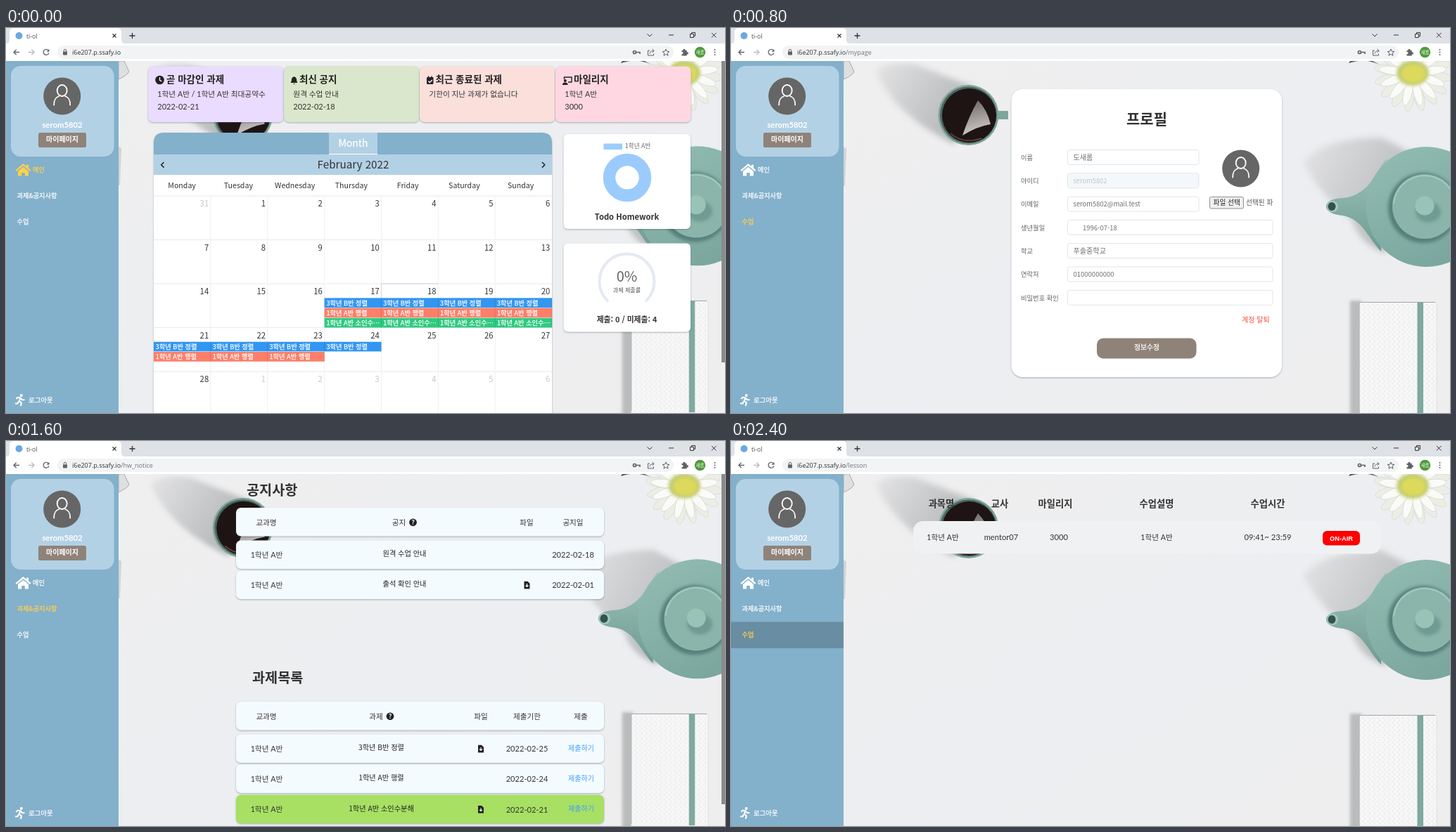
Animation of 1022 by 548 pixels, one loop 3.2 s. Source, as an HTML page:

```html
<!DOCTYPE html>
<html lang="ko">
<head>
<meta charset="utf-8">
<title>Class portal</title>
<style>
  html, body { margin: 0; width: 100%; height: 100%; overflow: hidden; background: #eee; }
  svg { display: block; width: 1022px; height: 548px; }
  text { font-family: "Noto Sans CJK KR", "Noto Sans CJK", sans-serif; white-space: pre; }
  .l { font-family: Lato, "Noto Sans CJK KR", "Noto Sans CJK", sans-serif; }
  .u { font-family: "Open Sans", "Noto Sans CJK KR", sans-serif; }
  .a { font-family: "Liberation Sans", sans-serif; }
  .m { text-anchor: middle; }
  .e { text-anchor: end; }
  .w { stroke: #fff; stroke-width: .25px; }
  .w.on { stroke: #ffd04b; }
  .b { font-weight: 700; }
  .soft { filter: blur(4px); }
  .near { filter: blur(2px); }
  .card { filter: drop-shadow(.6px 1.5px 1.2px rgba(60, 85, 95, .42)); }
  .scene { animation: show 3200ms step-end infinite; }
  @keyframes show {
    0% { visibility: visible; }
    25%, 100% { visibility: hidden; }
  }
</style>
</head>
<body>
<svg id="stage" viewBox="0 0 1022 548"></svg>
<script>
const INK = '#333', WHITE = '#fff', SIDE = '#83b0cb', PALE = '#b3d1e5', TAUPE = '#8f8379', GOLD = '#ffd04b';

const text = (x, y, s, size, fill = INK, cls = '') =>
  `<text x="${x}" y="${y}" font-size="${size}" fill="${fill}" class="${cls}">${s}</text>`;
const box = (x, y, w, h, fill, r = 0, more = '') =>
  `<rect x="${x}" y="${y}" width="${w}" height="${h}" rx="${r}" fill="${fill}" ${more}/>`;
const dot = (x, y, r, fill, more = '') => `<circle cx="${x}" cy="${y}" r="${r}" fill="${fill}" ${more}/>`;
const oval = (x, y, rx, ry, fill, more = '') =>
  `<ellipse cx="${x}" cy="${y}" rx="${rx}" ry="${ry}" fill="${fill}" ${more}/>`;
const shape = (d, fill, more = '') => `<path d="${d}" fill="${fill}" ${more}/>`;
const line = (d, stroke, w = 1, more = '') =>
  `<path d="${d}" fill="none" stroke="${stroke}" stroke-width="${w}" ${more}/>`;
const at = (x, y, s) => `<g transform="translate(${x} ${y})">${s}</g>`;
const times = (n, fn) => Array.from({ length: n }, (_, i) => fn(i)).join('');
const each = (list, fn) => list.map(fn).join('');

const fade = (id, x2, y2, from, to) =>
  `<linearGradient id="${id}" x2="${x2}" y2="${y2}"><stop stop-color="${from}"/><stop offset="1" stop-color="${to}"/></linearGradient>`;
const defs = `<defs>
  <linearGradient id="paper" x2="1" y2="1">
    <stop stop-color="#f0efef"/><stop offset=".5" stop-color="#eceef1"/><stop offset="1" stop-color="#efeeee"/>
  </linearGradient>
  ${fade('pot', .5, 1, '#93bdb3', '#7ba79e')}
  ${fade('spout', 0, 1, '#9cc3b9', '#6f9b92')}
  ${fade('gleam', .2, 1, '#6b6362', '#cbc8c7')}
  ${fade('shade', 1, .5, '#e4e4e5', '#b3b5b7')}
  <pattern id="weave" width="7" height="7" patternUnits="userSpaceOnUse">
    <path d="M1 2h3M5 4v3" stroke="#e4e6e7" stroke-width="1.2"/>
  </pattern></defs>`;

// Desk photo reduced to flat shapes
const petals = (n, len, w, fill, turn) => times(n, i =>
  oval(0, -len * .6, w, len * .42, fill, `transform="rotate(${turn + i * 360 / n})" stroke="#d3d8cc" stroke-width=".7"`));
const cup = shape('M206 62Q222 46 262 52L345 84L318 165Q234 126 206 62Z', 'url(#shade)', 'class="soft"')
  + box(374, 118, 20, 12, '#7da69b', 1)
  + dot(337.5, 124, 43, '#7fa59b') + dot(337.5, 124, 40.5, '#4d6660') + dot(338.5, 124.5, 38.5, '#1e1414')
  + shape('M351 103Q364 116 369 137Q350 140 329 153Q338 126 351 103Z', 'url(#gleam)')
  + line('M312 150Q330 166 356 157', '#6b4a38', 1.6);
const flower = shape('M878 50Q900 42 922 52L912 47H880Z', '#4c5a43')
  + at(969, 64, petals(16, 54, 7, '#eceee6', 8) + petals(13, 47, 6, '#fafaf7', 0)
  + oval(0, 0, 23, 18, '#c3cc74', 'class="near"') + oval(1, 1, 17, 13, '#dcd95c', 'class="near"'));
const teapot = shape('M814 192Q840 156 925 156L990 190L930 320Q892 306 882 272Q836 236 814 192Z', 'url(#shade)', 'class="soft"')
  + shape('M932 186C916 204 908 238 870 242C858 242 846 246 846 254C846 262 858 266 870 267C898 272 906 300 924 318Z', 'url(#spout)')
  + oval(855, 254, 8, 8, '#a3c8be') + oval(854, 254, 5.5, 6, '#34524d')
  + dot(988, 254.5, 85.5, 'url(#pot)')
  + dot(984, 256, 50, '#56807a', 'class="near"') + dot(986, 254, 46, '#8bb5ab')
  + line('M942 250A44 44 0 0 1 1022 229', '#a9cdc4', 1.5)
  + oval(991, 262, 18, 15, '#6f9b92', 'class="near"') + dot(986, 253, 13.5, '#9ac3b8');
const notebook = box(880, 388, 16, 170, '#b9bbbc', 0, 'class="near"')
  + box(893, 390, 110, 170, '#f7f7f7', 3, 'stroke="#dadbdb" stroke-width=".8"') + box(893, 390, 110, 170, 'url(#weave)', 3)
  + line('M893 548V390.500H1001', '#aaa') + box(975.5, 390, 8.5, 160, '#7fa99f');
const desk = box(160, 47, 874, 510, 'url(#paper)')
  + shape('M160 47H168L175 62Q172 68 160 73Z', '#dedfe0', 'stroke="#a8a9aa"')
  + shape('M160 169L164 172L162 225H160Z', '#d2d3d4') + cup + flower + teapot + notebook;

// Browser window and side menu
const person = dot(0, 0, 26.5, '#666') + oval(0, -8, 7, 8, 'none', 'stroke="#fff" stroke-width="1.800"')
  + line('M-11.500 12.500C-11.500 4 -8.500 1.500 -4.500 0M4.500 0C8.500 1.500 11.500 4 11.500 12.500', WHITE, 1.8, 'stroke-linecap="round"');

function chrome(path) {
  const gray = '#5f6368';
  return box(0, 0, 1022, 23, '#dee1e6') + box(0, 22, 1022, 25, WHITE)
    + shape('M0 22Q5 22 5 17V6Q5 0 11 0H158Q164 0 164 6V17Q164 22 169 22Z', WHITE)
    + dot(18.5, 11, 5, '#69a9e0') + text(29, 14.5, 'ti-ol', 8.6, '#45494d', 'u')
    + line('M151.5 8.5l5 5m0-5l-5 5', '#333', 1.2) + line('M175.5 11h8m-4-4v8', '#333', 1.3)
    + line('M911.5 8.5l3.5 3.5l3.5-3.5M942 10h7M972.5 8.5h5v5h-5zM974.5 8v-1.500h5v5h-1.500M1003 7l6.500 6.500m0-6.500l-6.500 6.500', '#333', 1)
    + line('M19 34.500h-8m3.700-3.700l-3.700 3.700l3.700 3.700', gray, 1.3)
    + line('M32 34.500h8m-3.700-3.700l3.700 3.700l-3.700 3.700', '#b9bcc0', 1.3)
    + line('M60.300 31.800A4 4 0 1 0 61 35.500', gray, 1.3) + shape('M61.500 30v3.800h-3.800z', gray)
    + box(73, 25, 876, 19, '#f1f3f4', 9.5)
    + box(81, 33.5, 6, 5, gray, .8) + line('M82.200 34v-1.800a1.800 1.800 0 0 1 3.600 0v1.800', gray)
    + text(94, 38, `i6e207.p.ssafy.io<tspan fill="#72767a">${path}</tspan>`, 9, '#303336', 'u')
    + dot(893.5, 34.5, 2, 'none', `stroke="${gray}" stroke-width="1.7"`) + line('M896 34.500h5v2.500', gray, 1.7)
    + line('M915 32h-2.500v7h8v-2.500M915 36.500q.5-4 5.500-4m-2-2.500l2.800 2.500l-2.800 2.500', gray, 1)
    + shape('M938 30l1.400 3.200l3.500.3l-2.700 2.300l.8 3.400l-3-1.800l-3 1.800l.8-3.400l-2.700-2.300l3.500-.3z', 'none', `stroke="${gray}"`)
    + shape('M960.500 32h2a1.700 1.700 0 1 1 3.200 0h2v2.300a1.700 1.700 0 1 1 0 3.200v2h-7.200v-2.500a1.500 1.500 0 1 0 0-2.800z', gray)
    + dot(986.5, 34.5, 7.7, '#4f9a3a') + text(986.5, 36.8, '새롬', 6.3, WHITE, 'm')
    + times(3, i => dot(1007.5, 31 + i * 3.5, 1, gray));
}

function sidebar(active, hover) {
  const tint = i => i === active ? GOLD : WHITE;
  const item = (i, x, y, s) => text(x, y, s, 9.2, tint(i), i === active ? 'w on' : 'w');
  return box(0, 47, 160, 501, SIDE) + box(7, 54, 146.5, 129, PALE, 14)
    + at(79.7, 97, person)
    + text(80, 142, 'serom5802', 11.3, WHITE, 'l b m')
    + box(46, 149, 68, 21, TAUPE, 2.5) + text(80, 161.8, '마이페이지', 10, WHITE, 'b m')
    + (hover ? box(0, 257.5, 160, 37.5, '#698da2') : '')
    + shape('M24.500 193L13.500 202.300L15 204L24.500 196L34 204L35.500 202.300L32 199.200V194.500H29.300V197Z'
      + 'M17 204L24.500 197.800L32 204V210.500H26.800V206H22.200V210.500H17Z', tint(0))
    + item(0, 38, 205, '메인') + item(1, 15.5, 242, '과제&amp;공지사항') + item(2, 15.5, 279.3, '수업')
    + dot(21.8, 523, 2, WHITE)
    + line('M14.500 528L16.500 525.800L20.500 526.300L22.800 529.300H26.500M20.300 526.500L18.700 531L22 533.500L20.800 538M17.800 531.500L16.800 534.500H13', WHITE, 2.1, 'stroke-linejoin="round"')
    + text(32, 533.3, '로그아웃', 9.4, WHITE, 'w');
}

// Main page
const icons = [
  dot(218.5, 74, 6.3, '#222') + line('M218.500 70v4.300l2.800 1.700', WHITE, 1.3),
  shape('M404.500 78Q406 76 406 73Q406.300 70 409.500 69.200Q412.700 70 413 73Q413 76 414.500 78ZM408 79h3q-1.500 2-3 0z', '#222'),
  box(598, 70, 9.5, 10, '#222', 1.2) + line('M600.500 68.500v2.500m4.500-2.500v2.500', '#222', 1.5) + line('M600.300 75.500l2 2l3.500-3.500', WHITE, 1.3),
  line('M793.500 73V70H804V77H799', '#222', 1.4) + dot(794.8, 75, 2, '#222') + shape('M790.800 81Q791 77.500 794.800 77.500Q798.500 77.500 798.700 81Z', '#222')
];
const summary = [
  [202, '#e9dcff', 228, '곧 마감인 과제', '1학년 A반 / 1학년 A반 최대공약수', '2022-02-21'],
  [395, '#dae7cc', 417, '최신 공지', '원격 수업 안내', '2022-02-18'],
  [588, '#fadfdb', 610.5, '최근 종료된 과제', '기한이 지난 과제가 없습니다', ''],
  [781, '#ffd7e2', 807, '마일리지', '1학년 A반', '3000']
];
const topCards = each(summary, ([x, fill, tx, title, a, b], i) =>
  box(x, 54.5, 192.5, 79.5, fill, 7, 'class="card"') + icons[i] + text(tx, 78.3, title, 13.5, '#222', 'b')
  + text(x + 13.3, 98, a, 10.7, INK, 'l') + text(x + 13.3, 116.3, b, 11, INK, 'l'));

function calendar() {
  const x0 = 210, cw = 80.86, top = 239, rh = 62.5;
  const days = ['Monday', 'Tuesday', 'Wednesday', 'Thursday', 'Friday', 'Saturday', 'Sunday'];
  const bar = (col, n, y, fill, label) => box(x0 + col * cw, y, n * cw, 13.7, fill)
    + times(n, i => text(x0 + (col + i) * cw + 2.8, y + 10.3, label, 9.2, WHITE, 'w')
    + line(`M${x0 + (col + i + 1) * cw} ${y}v13.700`, 'rgba(0,0,0,.15)', .8));
  const blue = '#3296f2', red = '#fd7e69', green = '#2fca80';
  return shape('M210 560V163Q210 149 224 149H762Q776 149 776 163V560Z', WHITE, 'class="card"')
    + shape('M210 180V163Q210 149 224 149H762Q776 149 776 163V180Z', SIDE)
    + box(459, 149, 69, 31, PALE) + line('M459 179.500h69', WHITE) + text(493.5, 169, 'Month', 14, WHITE, 'm w')
    + box(210, 180, 566, 29, PALE) + text(493.5, 200.3, 'February 2022', 15.2, INK, 'm')
    + line('M224.500 191l-3.800 3.800l3.800 3.800M762 191l3.800 3.800l-3.800 3.800', '#222', 1.5)
    + each(days, (d, i) => text(x0 + (i + .5) * 80.25, 228.3, d, 10.6, INK, 'm'))
    + times(5, r => line(`M210 ${top + r * rh}h566`, '#e8e8e8'))
    + times(6, c => line(`M${x0 + (c + 1) * cw} ${top}V548`, '#f0f0f0'))
    + line('M533.400 427V364H614.300', '#ccd3e2')
    + times(35, i => {
      const n = i < 1 ? 31 : i > 28 ? i - 28 : i;
      return text(x0 + (i % 7 + 1) * cw - 2.7, top + 15 + Math.floor(i / 7) * rh, n, 11.3, i < 1 || i > 28 ? '#c8c8c8' : INK, 'e');
    })
    + bar(3, 4, 384.3, blue, '3학년 B반 정렬') + bar(3, 4, 398.5, red, '1학년 A반 행렬')
    + bar(3, 4, 412.7, green, '1학년 A반 소인수⋯')
    + bar(0, 4, 446.7, blue, '3학년 B반 정렬') + bar(0, 3, 461, red, '1학년 A반 행렬');
}

const charts = box(792.5, 151, 180.5, 135, WHITE, 6, 'class="card"')
  + box(849.5, 164.5, 26.5, 8.5, '#9ccdfb') + text(880, 171.3, '1학년 A반', 8.6, '#666')
  + dot(883, 213, 25.5, 'none', 'stroke="#9bcbfd" stroke-width="17.500"')
  + text(882.5, 273, 'Todo Homework', 11.2, INK, 'b m')
  + box(792.5, 306.5, 180.5, 126, WHITE, 6, 'class="card"')
  + line('M854.900 388.100A39 39 0 1 1 910.100 388.100', '#e5e9f2', 4, 'stroke-linecap="round"')
  + text(882.5, 360.8, '0%', 20, '#606266', 'm') + text(882.5, 376, '과제 제출률', 8.1, '#555', 'm')
  + text(882.5, 418.5, '제출: 0 / 미제출: 4', 10.8, INK, 'b m');

// Profile form
const fields = [
  ['이름', '도새롬', 187, 10.1], ['아이디', 'serom5802', 187, 9.3], ['이메일', 'serom5802@mail.test', 187, 9.4],
  ['생년월일', '1996-07-18', 292, 9.5], ['학교', '푸솔중학교', 292, 10.1], ['연락처', '01000000000', 292, 9.5], ['비밀번호 확인', '', 292, 9]
];
const profile = box(398.5, 87, 384.5, 410, WHITE, 16, 'class="card"')
  + text(591, 136.5, '프로필', 21, INK, 'b m')
  + each(fields, ([label, value, w, size], i) => {
    const y = 173.5 + i * 33.3, off = i === 1;
    return text(412, y + 14.2, label, 9.3, '#606266')
      + box(478.5, y, w - .5, 21, off ? '#f5f8fa' : WHITE, 3, 'stroke="#dfe2e8" stroke-width=".9"')
      + text(i === 3 ? 500 : 486.5, y + 14.2, value, size, off ? '#c0c4cc' : '#6c6e72');
  })
  + at(724.7, 200, person)
  + box(680.5, 240.5, 48, 16.5, '#efefef', 2, 'stroke="#858585" stroke-width=".9"') + text(704.7, 252.2, '파일 선택', 9.7, '#222', 'm')
  + text(732, 252.2, '선택된 파', 9.7, '#555')
  + text(726, 419, '계정 탈퇴', 10, '#f0503c')
  + box(520, 441.5, 141.5, 29, TAUPE, 9) + text(591, 458.3, '정보수정', 9.8, WHITE, 'm w');

// Notices and homework
const help = (x, y) => dot(x, y, 5.4, '#222') + text(x, y + 3.3, '?', 9, WHITE, 'b m');
const file = (x, y) => shape(`M${x - 4} ${y - 5.3}h5l3 3v7.800h-8z`, '#222') + line(`M${x} ${y - 2}v4.500m-2-2l2 2l2-2`, WHITE, 1.1);
const strip = (y, fill = '#f4fbfe') => box(327, y, 523, 40.5, fill, 7, 'class="card"');
const heads = (y, list) => strip(y - 24.5) + each(list, ([x, s]) => text(x, y, s, 10.6, INK, 'm'));
const entry = (y, title, tx, date, dx, fx, fill) => strip(y - 24.5, fill)
  + text(370.5, y, '1학년 A반', 10.7, INK, 'l m') + text(tx, y - 1.6, title, 10.2, '#222', 'm')
  + text(dx, y + .2, date, 11.1, INK, 'l m') + (fx ? file(fx, y - 4) : '');
const work = (...a) => entry(...a) + text(817.5, a[0] - 1.5, '제출하기', 10, '#409eff', 'm');
const notices = text(342, 77, '공지사항', 19.7, INK, 'b')
  + heads(119.5, [[370, '교과명'], [558.5, '공지'], [740, '파일'], [806, '공지일']]) + help(578.5, 115.8)
  + entry(166, '원격 수업 안내', 566.5, '2022-02-18', 806, 0)
  + entry(209, '출석 확인 안내', 566.5, '2022-02-01', 806, 740.5)
  + text(350, 344.3, '과제목록', 19.7, INK, 'b')
  + heads(395.5, [[370, '교과명'], [526, '과제'], [675, '파일'], [740.5, '제출기한'], [817, '제출']]) + help(546, 391.8)
  + work(442, '3학년 B반 정렬', 533.5, '2022-02-25', 740.5, 675)
  + work(485, '1학년 A반 행렬', 533.5, '2022-02-24', 740.5, 0)
  + work(528.3, '1학년 A반 소인수분해', 533.5, '2022-02-21', 740.5, 675, '#a7e063');

// Lessons
const lesson = each([[299, '과목명'], [382, '교사'], [461, '마일리지'], [605, '수업설명'], [763, '수업시간']],
  ([x, s]) => text(x, 94, s, 13.3, INK, 'b m'))
  + box(259, 114, 665, 46.5, '#f0f1f3', 14)
  + each([[301, '1학년 A반'], [384, 'mentor07'], [466, '3000'], [605, '1학년 A반'], [763, '09:41~ 23:59']],
    ([x, s]) => text(x, 141, s, /반/.test(s) ? 10.6 : 11.2, INK, 'l m'))
  + box(841, 128, 53, 20.5, '#f00', 6) + text(867.5, 141.5, 'ON-AIR', 9.3, WHITE, 'a b m');

const scrollbar = h => box(1017, 47, 5, 501, '#f1f1f1') + box(1017, 47, 5, h, '#8b8b8b');
const scaled = `<g transform="translate(160 47) scale(.9942) translate(-160 -47)">${desk}</g>`;
const scenes = [
  scaled + topCards + calendar() + charts + scrollbar(429) + chrome('') + sidebar(0),
  desk + profile + chrome('/mypage') + sidebar(2),
  scaled + notices + scrollbar(470) + chrome('/hw_notice') + sidebar(1),
  desk + lesson + chrome('/lesson') + sidebar(2, true)
];
document.getElementById('stage').innerHTML = defs + each(scenes, (s, i) =>
  `<g class="scene" style="animation-delay:${(i - 4) * 800}ms">${s}</g>`);
</script>
</body>
</html>
```
